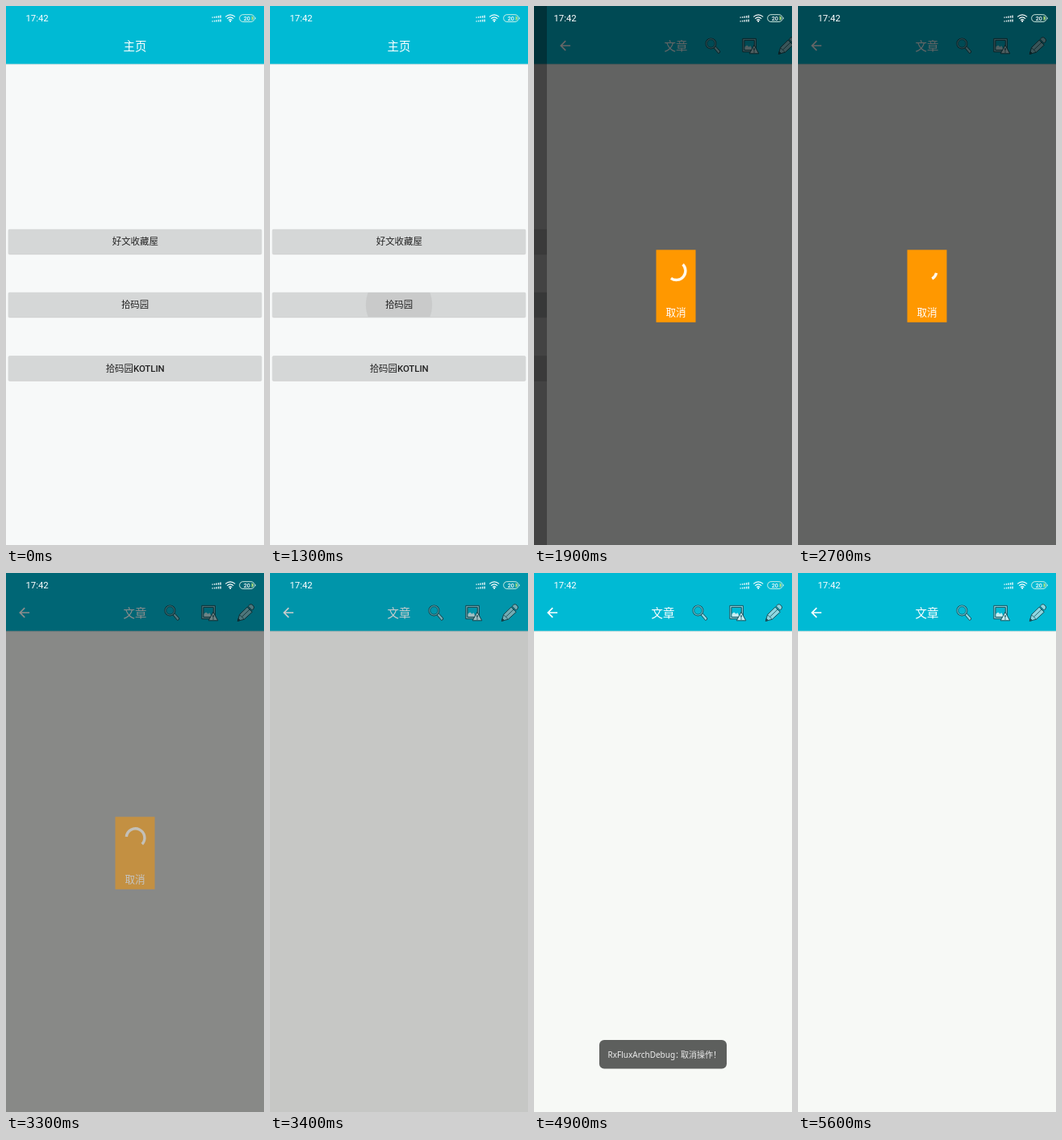
These frames come from a looping animation (320 px wide and 666 px high, 5.7 s). An HTML page:

```html
<!DOCTYPE html>
<html lang="zh-CN">
<head>
<meta charset="utf-8">
<title>主页</title>
<style>
  html, body { margin: 0; width: 100%; height: 100%; overflow: hidden; background: #f7f9f7; }
  svg { display: block; width: 100%; height: 100%; }
  text { font-family: Roboto, "Noto Sans CJK SC", "Noto Sans CJK", sans-serif; }
  .mid { text-anchor: middle; }
  .title { font-size: 14.4px; fill: #fff; }
  .label { font-size: 11.4px; fill: #222; }
  .label tspan { font-weight: 500; }
  .toast { font: 10px "Noto Sans", "Noto Sans CJK SC", "Noto Sans CJK", sans-serif; fill: #ececec; }
  .icon { fill: #8ed6e0; stroke: #17525c; stroke-width: 1; stroke-linejoin: round; }
</style>
</head>
<body>
<svg viewBox="0 0 320 666" preserveAspectRatio="none">
  <defs>
    <linearGradient id="fall" x2="0" y2="1">
      <stop offset="0" stop-color="#000" stop-opacity=".1"/>
      <stop offset="1" stop-color="#000" stop-opacity="0"/>
    </linearGradient>
    <g id="bar">
      <rect width="320" height="71.6" fill="#00bad4"/>
      <rect y="71.6" width="320" height="2" fill="url(#fall)"/>
    </g>
    <g id="button">
      <rect x="2.4" y="-.5" width="315.2" height="32" rx="2" fill="#000" opacity=".07"/>
      <rect x="2.8" y="0" width="314.4" height="31" rx="2" fill="#000" opacity=".09"/>
      <rect x="3" width="314" height="30" rx="1.5" fill="#d5d7d7"/>
    </g>
    <clipPath id="press"><rect x="3" y="354" width="314" height="30" rx="1.5"/></clipPath>
  </defs>

  <g id="home">
    <rect width="320" height="666" fill="#f7f9f9"/>
    <use href="#bar"/>
    <text class="title mid" x="160" y="54.7">主页</text>
    <use href="#button" y="276"/>
    <use href="#button" y="354"/>
    <use href="#button" y="432.6"/>
    <g clip-path="url(#press)"><circle id="ripple" cx="160" cy="369"/></g>
    <text class="label mid" x="160.3" y="295.2">好文收藏屋</text>
    <text class="label mid" x="160" y="373.4">拾码园</text>
    <text class="label mid" x="160.2" y="451.6">拾码园<tspan>KOTLIN</tspan></text>
  </g>
  <rect id="shade" width="320" height="666"/>

  <g id="page">
    <rect width="320" height="666" fill="#f7f9f6"/>
    <use href="#bar"/>
    <path transform="translate(12.9 39.3) scale(.81)" fill="#fff"
      d="M20 11H7.83l5.59-5.59L12 4l-8 8 8 8 1.41-1.41L7.83 13H20z"/>
    <text class="title mid" x="160" y="54.7">文章</text>
    <g class="icon">
      <path d="M206.9 51.6l2.2-2 5.6 6.2q.6 2.2-2.1 2.7z"/>
      <circle cx="203.4" cy="46.4" r="5.6" fill="none" stroke-width="2.8"/>
      <circle cx="203.4" cy="46.4" r="5.6" fill="#00bad4" stroke="#8ed6e0"/>
      <circle cx="203.4" cy="46.4" r="4.7" fill="none" stroke-width=".7"/>
    </g>
    <g class="icon">
      <rect x="242.8" y="40.3" width="16.6" height="16.4"/>
      <rect x="244.9" y="42.4" width="12.4" height="12.2" fill="#00bad4"/>
      <path d="M245.5 54v-3.4l2.6-2.2 2.4 2 2.2-1.2 2 4.8z" fill="#c6edf2" stroke="none"/>
      <path d="M257 48.2l5.8 10.6h-11.6z" fill="#c6edf2"/>
      <path d="M257 52v3.2M257 56.2v1.2" stroke-width="1.3"/>
    </g>
    <g class="icon">
      <path d="M287.3 59.4l2.3-8 9.6-9.3 6.1 6.1-9.8 9z"/>
      <path d="M300.3 41l2-1.9q1.8-1.4 4 .8t.9 4l-1.9 2.2z"/>
      <path d="M289.6 51.4l5.9 5.8M292.8 54l9.6-9.2M299.2 42.1l6.1 6.1" fill="none" stroke-width=".8"/>
      <path d="M287.3 59.4l.9-3.1 2.2 2.2z" fill="#17525c"/>
    </g>
  </g>

  <rect id="dim" width="320" height="666"/>

  <g id="dialog">
    <rect x="135.5" y="301.3" width="49" height="89.5" fill="#ff9800"/>
    <path id="arc" fill="none" stroke="#fff8ea" stroke-width="3.4"/>
    <text class="mid" x="160" y="382.6" font-size="12.6" fill="#fff">取消</text>
  </g>

  <g id="toast">
    <rect x="81" y="577" width="158" height="35.5" rx="6" fill="#5d5f5d"/>
    <text class="toast" x="91.6" y="598.7">RxFluxArchDebug：</text>
    <text class="toast" x="182" y="598.7">取消操作！</text>
  </g>

  <g id="status" fill="#fff">
    <text x="24.4" y="19.3" font-size="11.4">17:42</text>
    <path id="signal" opacity=".85"/>
    <g fill="none" stroke="#fff" stroke-width="1.2">
      <path d="M272.2 13.4q6-5 12 0M274.2 15.6q4-3.4 8 0M276.1 17.6q2.1-1.8 4.2 0"/>
      <rect x="289.7" y="10.7" width="18.4" height="8.8" rx="4.2" stroke="#e3f7ea" stroke-width=".9"/>
    </g>
    <circle cx="278.2" cy="18.8" r="1.1"/>
    <path d="M309 13.4q1.6 1.7 0 3.4z"/>
    <path d="M304.6 12.2q2.2.6 2.2 2.9t-2.2 2.9z" fill="#b4e37c"/>
    <text class="mid" x="298.8" y="17.7" font-size="7.2" font-weight="500">20</text>
  </g>
</svg>
<script>
const LOOP = 5700, STEP = 100, SPIN_START = 1640, SPIN_CYCLE = 1333;
const el = id => document.getElementById(id);
const set = (id, attrs) => {
  for (const k in attrs) el(id).setAttribute(k, attrs[k]);
};
const clamp = v => Math.min(1, Math.max(0, v));

// Tracks of [time, value], linear in between
const tracks = {
  pageX: [[1600, 320], [1700, 255], [1800, 90], [1900, 16], [2000, 2], [2100, 0]],
  dim: [[1650, 0], [1700, .085], [1800, .38], [1900, .6], [3200, .6], [3300, .45], [3400, .2], [3500, .04], [3600, 0]],
  dialog: [[1650, 0], [1700, .3], [1800, .8], [1900, 1], [3200, 1], [3300, .5], [3400, 0]],
  toast: [[3600, 0], [3800, 1], [5100, 1], [5600, 0]],
  rippleR: [[1200, 0], [1600, 165]],
  rippleA: [[1200, 0], [1400, .12], [1700, .12], [2000, 0]]
};

function at(name, t) {
  const track = tracks[name];
  let prev = track[0];
  if (t <= prev[0]) return prev[1];
  for (const next of track) {
    if (t < next[0]) return prev[1] + (next[1] - prev[1]) * (t - prev[0]) / (next[0] - prev[0]);
    prev = next;
  }
  return prev[1];
}

// cubic-bezier(.4, 0, .2, 1)
function ease(x) {
  let lo = 0, hi = 1;
  for (let i = 0; i < 20; i++) {
    const s = (lo + hi) / 2, r = 1 - s;
    if (1.2 * s * r * r + .6 * s * s * r + s * s * s < x) lo = s; else hi = s;
  }
  return lo * lo * (3 - 2 * lo);
}

function arcPath(t) {
  const age = Math.max(0, t - SPIN_START);
  const u = age % SPIN_CYCLE / SPIN_CYCLE;
  const turn = .25 * u - .29 + age * .162 / 360;
  const tail = turn + .75 * ease(clamp(2 * u - 1));
  const head = turn + .03 + .75 * ease(clamp(2 * u));
  const point = a => {
    const rad = a * 2 * Math.PI;
    return (160.6 + 11.3 * Math.cos(rad)).toFixed(2) + " " + (327.2 + 11.3 * Math.sin(rad)).toFixed(2);
  };
  return `M${point(tail)}A11.3 11.3 0 ${head - tail > .5 ? 1 : 0} 1 ${point(head)}`;
}

function draw(t) {
  const x = at("pageX", t), p = 1 - x / 320;
  set("home", { transform: `translate(${-70 * p} 0)` });
  set("shade", { opacity: .34 * p });
  set("page", { transform: `translate(${x} 0)` });
  set("ripple", { r: at("rippleR", t), opacity: at("rippleA", t) });
  set("dim", { opacity: at("dim", t) });
  set("dialog", { transform: `translate(${x} 0)`, opacity: at("dialog", t) });
  set("arc", { d: arcPath(t) });
  set("toast", { opacity: at("toast", t) });
}

let bars = "";
for (const base of [14.8, 19.6]) {
  for (let i = 0; i < 5; i++) {
    const h = 1.4 + i * .45;
    bars += `M${255.4 + i * 2.5} ${base - h}h1.5v${h}h-1.5z`;
  }
}
set("signal", { d: bars });

const start = performance.now();
function tick() {
  const t = (performance.now() - start) % LOOP;
  draw(Math.floor(t / STEP) * STEP);
  requestAnimationFrame(tick);
}
draw(0);
tick();
</script>
</body>
</html>
```
